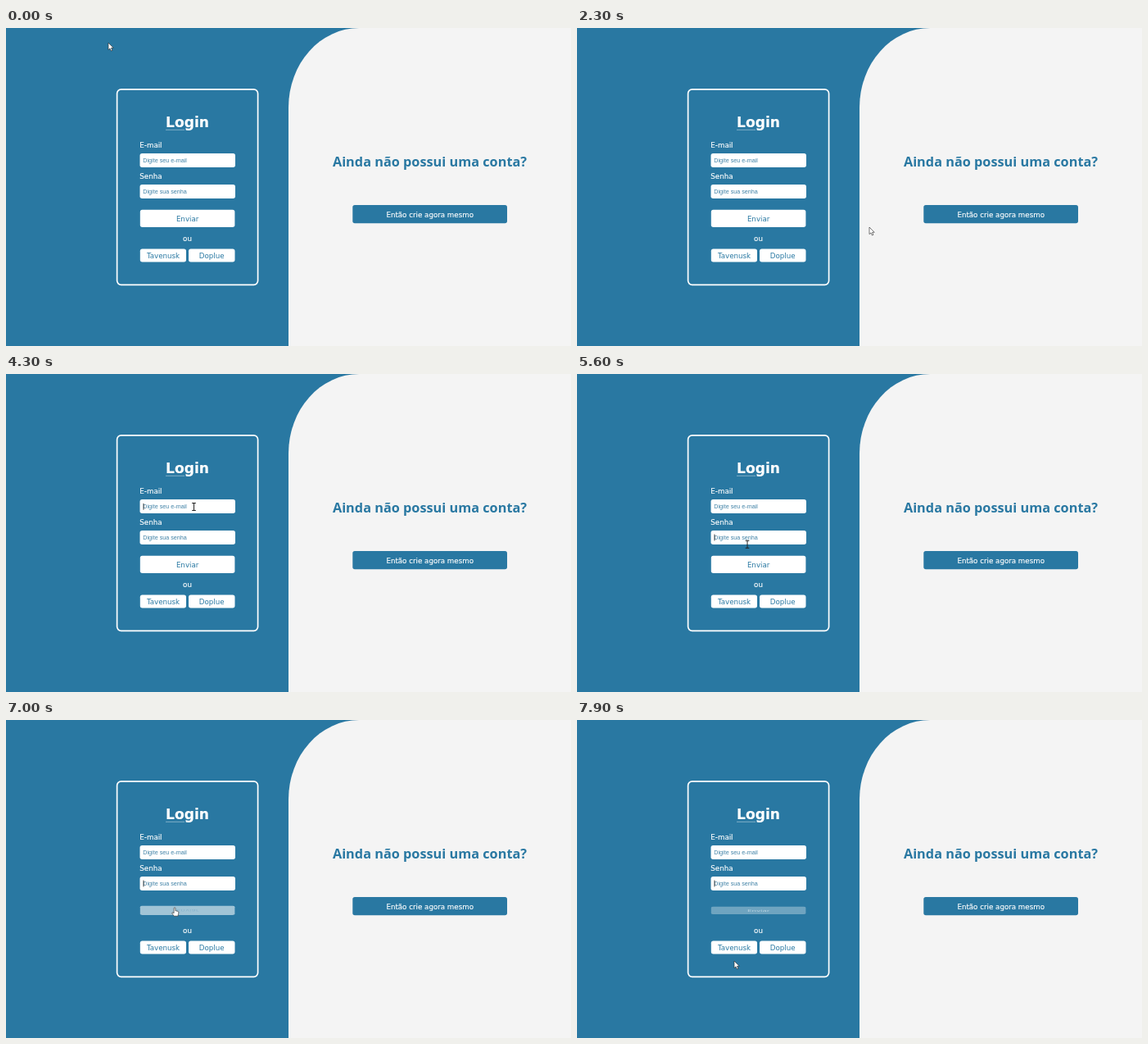
An HTML page that plays this animation: 690x388 px, repeating every 8 s.

```html
<!DOCTYPE html>
<html lang="pt-BR">
<head>
<meta charset="utf-8">
<title>Login</title>
<style>
  html, body { margin: 0; width: 100%; height: 100%; overflow: hidden; background: #2978a2; }
  svg { display: block; width: 690px; height: 388px; }
  text { font: 8.7px "DejaVu Sans", sans-serif; fill: #2978a2; }
  .light { fill: #fff; }
  text.light { stroke: #fff; stroke-width: .15; }
  .mid { text-anchor: middle; }
  .hint { font: 7.2px "Liberation Sans", sans-serif; fill: #3f81a6; }
  .title { font-size: 17.1px; font-weight: 700; }
  .question { font: 700 16.3px "Open Sans", sans-serif; }
  .pointer { fill: #fff; stroke: #222; stroke-width: .6; stroke-linejoin: round; }
</style>
</head>
<body>
<svg viewBox="0 0 690 388">
  <rect width="690" height="388" fill="#2978a2"/>
  <path d="M690 0H431.25A86.25 97 0 0 0 345 97V388H690Z" fill="#f4f4f4"/>

  <rect x="135.6" y="74.9" width="172" height="238.4" rx="5" fill="none" stroke="#fff" stroke-width="1.7"/>
  <text class="light mid title" x="221.5" y="120.5">Login</text>
  <rect x="195" y="123.8" width="23" height=".8" fill="#fff" opacity=".5"/>

  <text class="light" x="163.3" y="146">E-mail</text>
  <rect class="light" x="163.5" y="153" width="116.5" height="17" rx="2.7"/>
  <text class="hint" x="167.3" y="164">Digite seu e-mail</text>
  <text class="light" x="163.3" y="184">Senha</text>
  <rect class="light" x="163.5" y="191" width="116.5" height="17" rx="2.7"/>
  <text class="hint" x="167.3" y="202">Digite sua senha</text>
  <rect id="caret" x="167.6" width=".8" height="8" fill="#222"/>

  <g id="send">
    <rect x="-57.8" y="-10.6" width="115.6" height="21.2" rx="2.7"/>
    <text class="mid" y="3.3">Enviar</text>
  </g>
  <text class="light mid" x="221.5" y="259.5">ou</text>
  <rect class="light" x="163.8" y="269.5" width="56.2" height="16" rx="2.7"/>
  <text class="mid" x="192" y="280.8">Tavenusk</text>
  <rect class="light" x="223" y="269.5" width="56.5" height="16" rx="2.7"/>
  <text class="mid" x="251.2" y="280.8">Doplue</text>

  <text class="mid question" x="517.5" y="168.7">Ainda não possui uma conta?</text>
  <rect x="423.3" y="216" width="188.7" height="22.3" rx="2.7" fill="#2978a2"/>
  <text class="light mid" x="517.7" y="230.7">Então crie agora mesmo</text>

  <path id="arrow" class="pointer" d="M0 0V8.6L2 6.9L3.4 10L4.9 9.3L3.5 6.3H6.2Z"/>
  <path id="beam" d="M-2.3 -4.5H2.3M0 -4.5V4.5M-2.3 4.5H2.3" fill="none" stroke="#222"/>
  <path id="hand" class="pointer" d="M-.9 .7Q0 -.7 .9 .7V4L4 4.7Q5 5 4.8 6.5L4 10.5H-.8L-3.2 7.2Q-3.4 5.8 -2 6.2L-.9 7Z"/>
</svg>
<script>
const LOOP = 8000, STEP = 100, FLIP = 1410, BLINK = 550;
const HOVER = 6140, LEAVE = 7520, FOCUS_EMAIL = 4300, FOCUS_PASSWORD = 5600;
const [caret, send, arrow, beam, hand] = ['caret', 'send', 'arrow', 'beam', 'hand']
  .map(id => document.getElementById(id));
const [sendBox, sendText] = send.children;

// Where the mouse rests, when it gets there and how long the way takes
const stops = [
  { at: 1200, ms: 700, x: 257, y: 67 },
  { at: 1600, ms: 300, x: 357, y: 124 },
  { at: 2300, ms: 100, x: 357, y: 243 },
  { at: 3000, ms: 200, x: 444, y: 316 },
  { at: 3400, ms: 300, x: 333, y: 113 },
  { at: 4100, ms: 600, x: 229.5, y: 162 },
  { at: 5400, ms: 500, x: 208, y: 207.8 },
  { at: 6400, ms: 300, x: 206, y: 228.7 },
  { at: 7900, ms: 400, x: 192, y: 294 }
];

function ease(p) {
  p = Math.min(1, Math.max(0, p));
  return p * p * (3 - 2 * p);
}

function mix(white) {
  return `rgb(${[41, 120, 162].map(c => Math.round(c + (255 - c) * white))})`;
}

function show(node, on) {
  node.style.display = on ? '' : 'none';
}

function drawCursor(t, flipped) {
  let x = 125, y = 18;
  for (const stop of stops) {
    const p = ease((t - stop.at + stop.ms) / stop.ms);
    x += (stop.x - x) * p;
    y += (stop.y - y) * p;
  }
  const inside = (top, bottom) => x > 163 && x < 280 && y >= top && y <= bottom;
  const typing = inside(153, 170) || inside(191, 208);
  const pressing = flipped > .3 && inside(222, 243);
  const active = typing ? beam : pressing ? hand : arrow;
  for (const node of [arrow, beam, hand]) show(node, node === active);
  active.setAttribute('transform', `translate(${x} ${y})`);
}

function drawCaret(t) {
  const inPassword = t >= FOCUS_PASSWORD;
  const since = t - (inPassword ? FOCUS_PASSWORD : FOCUS_EMAIL);
  caret.setAttribute('y', inPassword ? 195.5 : 157.8);
  show(caret, since >= 0 && since % (2 * BLINK) < BLINK);
}

// Hovering turns the button once around while its colours swap
function drawButton(flipped) {
  const white = 1 - flipped ** 2;
  send.setAttribute('transform', `translate(221.6 232.4) scale(1 ${Math.cos(flipped * 2 * Math.PI)})`);
  sendBox.style.fill = mix(white);
  sendText.style.fill = mix(1 - white);
}

function draw(now) {
  const t = Math.floor(now % LOOP / STEP) * STEP;
  const flipped = ease((t - HOVER) / FLIP) - ease((t - LEAVE) / FLIP);
  drawCursor(t, flipped);
  drawCaret(t);
  drawButton(flipped);
}

const start = performance.now();
function tick() {
  draw(performance.now() - start);
  requestAnimationFrame(tick);
}
tick();
</script>
</body>
</html>
```
